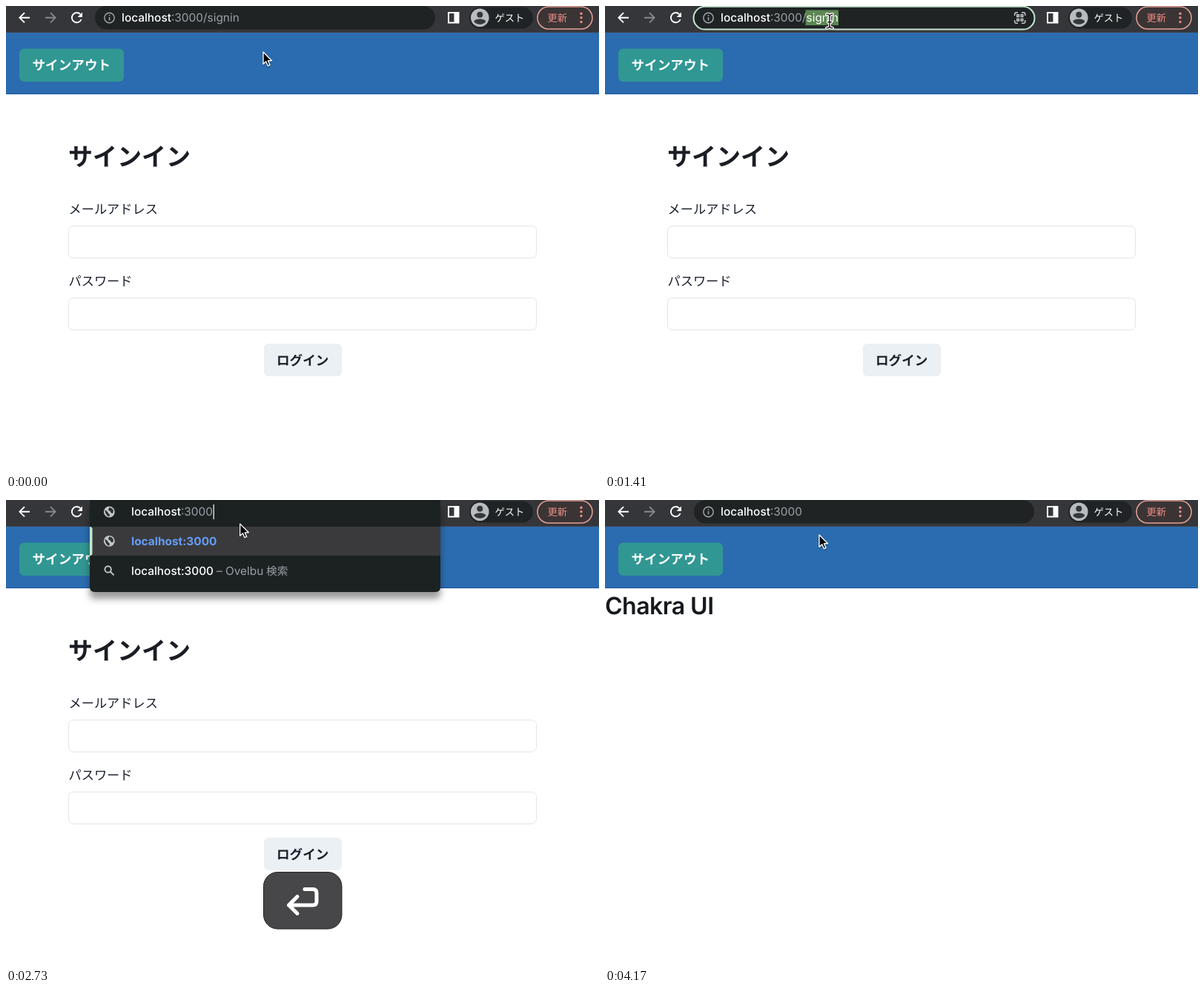
Recreate the animation shown at these times as an HTML page. Size 800 by 628 pixels, loop 4.2 s.

```html
<!DOCTYPE html>
<html lang="ja">
<head>
<meta charset="utf-8">
<title>サインイン</title>
<style>
  html, body { margin: 0; width: 100%; height: 100%; overflow: hidden; background: #fff; }
  svg { display: block; width: 800px; height: 628px; }
  text { font-family: Inter, "Noto Sans CJK JP", "Noto Sans CJK", sans-serif; text-rendering: geometricPrecision; white-space: pre; }
  .url { font-size: 15.4px; fill: #9aa0a6; }
  .host { fill: #fff; font-weight: 500; }
  .small { font-size: 13.3px; }
  .label { font-size: 17.2px; fill: #1a202c; }
  .button { font-size: 17.6px; font-weight: 700; }
  .line { fill: none; stroke-width: 1.9; }
</style>
</head>
<body>
<svg viewBox="0 0 800 628" xmlns="http://www.w3.org/2000/svg">
  <defs>
    <filter id="shadow" x="-10%" y="-20%" width="120%" height="150%">
      <feDropShadow dx="0" dy="9" stdDeviation="5" flood-opacity=".4"/>
    </filter>
    <filter id="soft" x="-50%" y="-50%" width="200%" height="200%">
      <feDropShadow dx="0" dy="1.2" stdDeviation="1" flood-opacity=".35"/>
    </filter>
    <g id="globe">
      <circle r="7.4" fill="#c4c7ca"/>
      <path d="M-6 -2.5 Q-3 -1.5 -2 0.5 T1 4 L-.5 6.4 Q-5 5 -6 -2.5Z M0 -6 Q4 -5.5 5.6 -2 L5 2 Q2 2 1.5 -.5 L-1.5 -2.5Z" fill="#303437"/>
    </g>
  </defs>

  <rect width="800" height="628" fill="#fff"/>

  <g id="signin">
    <text x="84" y="214.5" font-size="33" font-weight="700" fill="#1a1d23">サインイン</text>
    <text class="label" x="84.5" y="280">メールアドレス</text>
    <text class="label" x="84.5" y="377">パスワード</text>
    <g fill="#fff" stroke="#e2e5e9">
      <rect x="84.5" y="296.5" width="631" height="43" rx="6"/>
      <rect x="84.5" y="393.5" width="631" height="43" rx="6"/>
    </g>
    <rect x="348" y="455" width="105" height="44" rx="6" fill="#ebf0f4"/>
    <text class="button" x="365" y="483.5" fill="#1a202c">ログイン</text>
  </g>

  <text id="home" x="0" y="154" font-size="32" font-weight="600" letter-spacing="-.5" fill="#16191e">Chakra UI</text>

  <rect y="36" width="800" height="83" fill="#2b6cb0"/>
  <rect y="118" width="800" height="1" fill="#1f56a0"/>
  <rect id="signout" x="18" y="57.5" width="141" height="44.5" rx="6.5"/>
  <text class="button" x="35.5" y="86" fill="#fff">サインアウト</text>

  <rect width="800" height="36" fill="#35363a"/>
  <rect y="35" width="800" height="1" fill="#444549"/>
  <g class="line" stroke="#fff">
    <path d="M32 15.8H18.8 M25 9.2L18.4 15.8L25 22.4"/>
    <path d="M53 15.8H66.2 M60 9.2L66.6 15.8L60 22.4" stroke="#85888c"/>
    <path d="M100.3 11.2A6.6 6.6 0 1 0 101.6 18"/>
  </g>
  <path d="M103 8.6V15H96.6Z" fill="#fff"/>

  <rect x="120" y="0" width="459" height="31.5" rx="15.7" fill="#1f2324"/>
  <g id="focus">
    <rect x="119.5" y=".8" width="460" height="30.8" rx="15.4" fill="#1f2324" stroke="#c3e6ce" stroke-width="2"/>
    <g fill="none" stroke="#c4c7ca" stroke-width="1.5">
      <path d="M552.7 13V11Q552.7 8.7 555 8.7H557 M562 8.7H564.5Q566.8 8.7 566.8 11V13 M566.8 19V21Q566.8 23.3 564.5 23.3H562 M557 23.3H555Q552.7 23.3 552.7 21V19"/>
      <path d="M555.8 11.8h2.6v2.6h-2.6z M561.2 11.8h2.6v2.6h-2.6z M555.8 17.4h2.6v2.6h-2.6z M561.2 17.4h2.6v2.6h-2.6z"/>
    </g>
    <rect x="270.5" y="5.5" width="44.5" height="20.5" fill="#5c8752"/>
  </g>
  <circle cx="139.5" cy="16" r="6.7" fill="none" stroke="#a4a8ac" stroke-width="1.4"/>
  <path d="M139.5 15V19.6 M139.5 12V13.6" stroke="#a4a8ac" stroke-width="1.5"/>
  <text class="url" x="156" y="21.3"><tspan class="host">localhost</tspan>:3000<tspan id="slash">/</tspan><tspan id="path">signin</tspan></text>

  <rect x="597" y="9" width="13.5" height="13.5" fill="none" stroke="#fff" stroke-width="2"/>
  <rect x="604.5" y="9" width="6" height="13.5" fill="#fff"/>
  <rect x="625" y="1.5" width="86" height="29" rx="14.5" fill="#202325"/>
  <circle cx="639.3" cy="15.8" r="12.3" fill="#b9bcbf"/>
  <circle cx="639.3" cy="11.8" r="4" fill="#34373b"/>
  <path d="M631.3 21Q632 17.4 639.3 17.4T647.3 21Q644.3 24.8 639.3 24.8T631.3 21Z" fill="#34373b"/>
  <text class="small" x="659.5" y="21" fill="#fff" font-weight="500">ゲスト</text>
  <rect x="717" y="1" width="74" height="30" rx="15" fill="#3b3435" stroke="#e5a197" stroke-width="1.5"/>
  <text class="small" x="730.5" y="21" fill="#ec8e84" font-weight="500">更新</text>
  <g fill="#ec8e84"><circle cx="776" cy="10.2" r="1.7"/><circle cx="776" cy="15.8" r="1.7"/><circle cx="776" cy="21.4" r="1.7"/></g>

  <g id="dropdown">
    <path d="M113 0H586V117.5Q586 124 579.5 124H119.5Q113 124 113 117.5Z" fill="#1f2324" filter="url(#shadow)"/>
    <rect x="113" y="36" width="473" height="39" fill="#3a3a3d"/>
    <path d="M113 36Q116.5 36 116.5 39.5V71.5Q116.5 75 113 75Z" fill="#c3e6ce"/>
    <use href="#globe" x="139.3" y="16"/>
    <use href="#globe" x="139.3" y="55.3"/>
    <g class="line" stroke="#c4c7ca" stroke-width="1.6"><circle cx="137.6" cy="93.4" r="4.2"/><path d="M140.7 96.5L145.6 101.4"/></g>
    <text class="url" x="169" y="21.3"><tspan class="host">localhost</tspan>:3000<tspan id="typedSlash">/</tspan></text>
    <rect id="caret" y="6" width="1.2" height="20" fill="#fff"/>
    <text class="url" x="169" y="61" style="font-weight:700;fill:#669df6">localhost:3000</text>
    <text class="url" x="169" y="101"><tspan class="host">localhost:3000</tspan></text>
    <text class="url" x="284" y="101">–</text>
    <text class="url" x="296" y="101">Ovelbu</text>
    <text class="url" x="351" y="101" style="font-size:14.7px">検索</text>
  </g>

  <g id="key">
    <rect x="347.5" y="501.5" width="105.5" height="76.5" rx="19" fill="#474749" stroke="#242426"/>
    <path d="M403 524.5H414Q419 524.5 419 529.5V541Q419 546 414 546H381.5 M393 534.5L381.5 546L393 557.2" fill="none" stroke="#fff" stroke-width="5" stroke-linecap="round" stroke-linejoin="round"/>
  </g>

  <circle id="ring" cx="303" cy="21" r="20.5" fill="none" stroke="#3f8745" stroke-width="2.2"/>

  <g id="cursor" filter="url(#soft)" stroke-linejoin="round">
    <path id="arrow" d="M0 0V16.2L3.8 12.7L6.3 18.6L9 17.4L6.5 11.7H11.6Z" fill="#000" stroke="#fff" stroke-width="1.3"/>
    <g id="beam" fill="none" stroke-linecap="round">
      <path id="stem" d="M-4 -8.5Q0 -8.5 0 -5.5Q0 -8.5 4 -8.5 M0 -5.5V7 M-4 10Q0 10 0 7Q0 10 4 10 M-2.5 2H2.5" stroke="#fff" stroke-width="3.6"/>
      <use href="#stem"/>
      <path d="M-4 -8.5Q0 -8.5 0 -5.5Q0 -8.5 4 -8.5 M0 -5.5V7 M-4 10Q0 10 0 7Q0 10 4 10 M-2.5 2H2.5" stroke="#111" stroke-width="1.4"/>
    </g>
    <g id="hand">
      <path d="M-2.8 -7.5Q-1 -9.6 .4 -7.2L2 -2.4Q3.6 -3.6 4.6 -1.8Q6 -2.6 6.8 -.8Q8.4 -1.2 8.7 .8V4Q8.6 6 7.6 7.4V9.4H-.2V8Q-2.6 6.4 -4.2 3.6L-7 .8Q-7.2 -1.4 -4.8 -.8L-2.2 1.2L-3.4 -5.4Z" fill="#fff" stroke="#000" stroke-width="1.2"/>
      <path d="M1.2 3V6.5M3.4 3V6.5M5.6 3V6.5" stroke="#000"/>
    </g>
  </g>
</svg>
<script>
const LOOP = 4200;
const $ = id => document.getElementById(id);
const clamp = v => Math.max(0, Math.min(1, v));
const ease = v => v * v * (3 - 2 * v);
const ramp = (t, start, end) => ease(clamp((t - start) / (end - start)));
const show = (id, on) => $(id).style.display = on ? "" : "none";

// time, x, y of the pointer's hot spot
const track = [
  [0, 347, 62], [150, 347, 62], [840, 303, 20], [2640, 303, 18.5],
  [3150, 454, 180], [3270, 454, 180], [3780, 157, 67], [3900, 157, 67], [4140, 289, 47], [LOOP, 289, 47]
];
const clicks = [930, 1140];

function pointer(t) {
  const i = track.findIndex(point => point[0] > t);
  const [t0, x0, y0] = track[i - 1], [t1, x1, y1] = track[i];
  const k = ramp(t, t0, t1);
  return [x0 + (x1 - x0) * k, y0 + (y1 - y0) * k];
}

const pulse = (t, start) => t < start ? 0 : ramp(t, start - 30, start + 30) * (1 - ramp(t, start + 60, start + 210));

function draw(t) {
  const typing = t >= 1710 && t < 2760;
  const loaded = t >= 2820;
  const trimmed = t >= 1920;
  show("signin", !loaded);
  show("home", loaded);
  show("focus", t >= 1170 && t < 1710);
  show("slash", t < 1710);
  show("path", t < 1710);
  $("path").style.fill = t >= 1170 ? "#fff" : "";
  show("dropdown", typing);
  show("typedSlash", !trimmed);
  $("caret").setAttribute("x", trimmed ? 279.6 : 285);

  const keyOpacity = ramp(t, 2580, 2640) * (1 - ramp(t, 3360, 3570));
  $("key").setAttribute("opacity", keyOpacity);
  $("ring").setAttribute("opacity", .8 * Math.max(...clicks.map(c => pulse(t, c))));

  const [x, y] = pointer(t);
  const beam = y < 31 && t < 1740;
  const hand = x < 160 && y > 56 && y < 103;
  $("cursor").setAttribute("transform", `translate(${x} ${y})`);
  show("beam", beam);
  show("hand", hand);
  show("arrow", !beam && !hand);

  const hover = ramp(t, 3750, 3840) * (1 - ramp(t, 3930, 4140));
  const mix = (a, b) => Math.round(a + (b - a) * hover);
  $("signout").setAttribute("fill", `rgb(${mix(49, 46)},${mix(151, 132)},${mix(147, 130)})`);
}

function frame() {
  draw(performance.now() % LOOP);
  requestAnimationFrame(frame);
}
frame();
</script>
</body>
</html>
```
